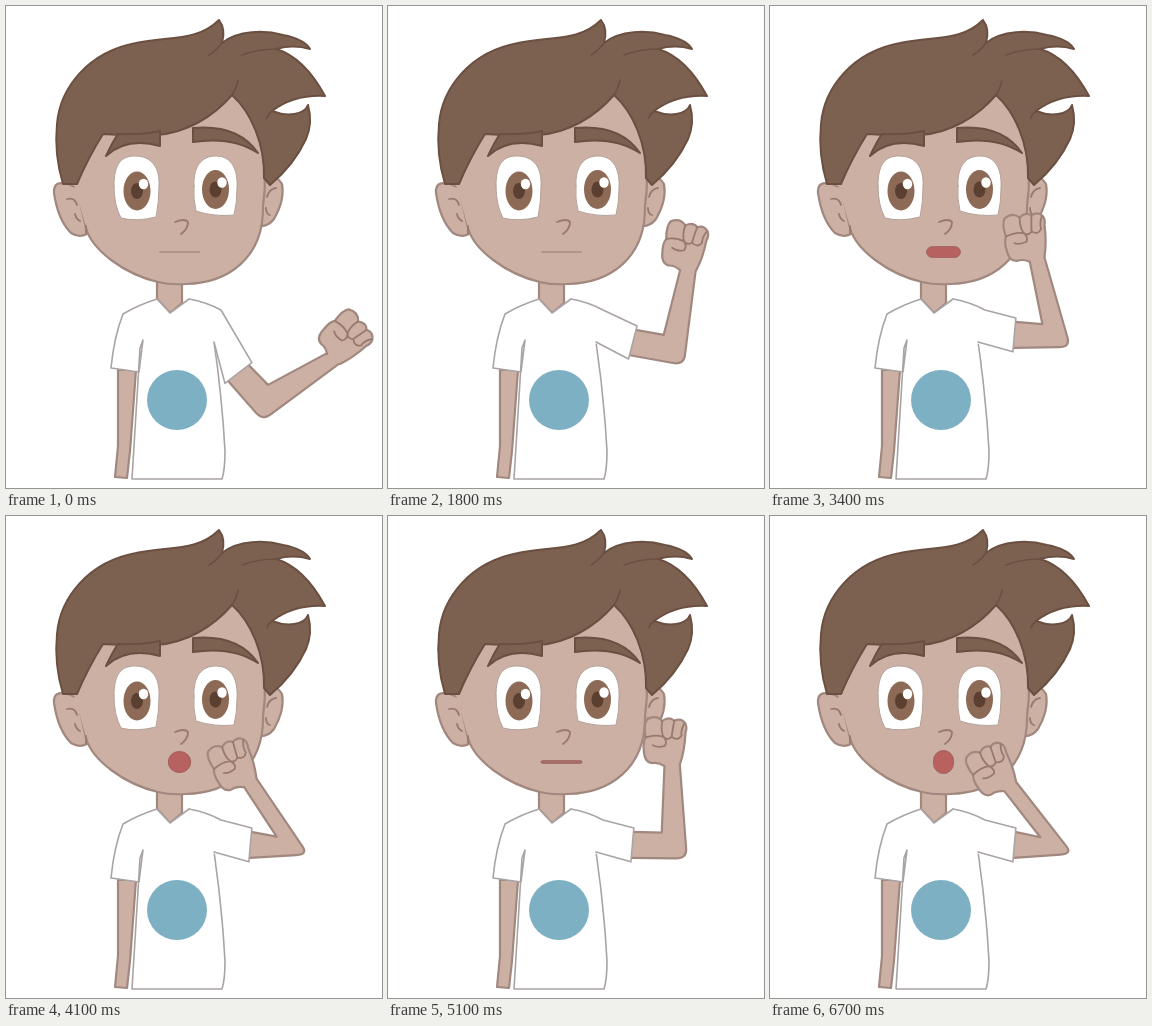
These frames come from a looping animation (376x482 px, 6.8 s). An HTML page:

```html
<!DOCTYPE html>
<html lang="en">
<head>
<meta charset="utf-8">
<title>Boy raising his fist</title>
<style>
  html, body { margin: 0; width: 100%; height: 100%; overflow: hidden; background: #fff; }
  svg { display: block; width: 376px; height: 482px; }
  path { stroke-linejoin: round; stroke-linecap: round; }
  .skin { fill: #cdb0a4; stroke: #a1887f; stroke-width: 2.2; }
  .hair { fill: #7c6150; stroke: #6b4f41; stroke-width: 2; }
  .cloth { fill: #fff; stroke: #a9a3a4; stroke-width: 1.6; }
  .line { fill: none; stroke: #98796d; stroke-width: 1.8; }
  .strand { fill: none; stroke: #6b4f41; stroke-width: 1.6; }
  .eye { fill: #fff; stroke: #b3a19a; stroke-width: 1; }
</style>
</head>
<body>
<svg viewBox="0 0 376 482">
  <!-- head -->
  <path class="skin" d="M112 364 V440 L109 471 L121 472 L124 445 L130 364Z"/>
  <path class="skin" d="M151 270 V293 L164 307 L176 297 V270Z"/>
  <path class="skin" d="M257 174 Q268 165 276 178 Q279 194 268 213 Q262 221 253 220Z"/>
  <path class="skin" d="M62 178 Q47 174 48 187 Q52 214 65 227 Q73 232 81 228 L90 190Z"/>
  <path class="skin" d="M80 222 C86 244 118 268 152 276 Q164 279 180 278 C222 277 258 252 257 200 Q267 130 226 86 L98 120 Q76 160 70 178Z"/>
  <path d="M68 179 L80 221 L100 210 L100 160Z" fill="#cdb0a4"/>
  <path class="line" d="M61 193 Q69 191 71 199 M69 208 Q70 213 74 215 M80 220 V227 M270 182 Q263 183 261 191 M260 202 Q260 208 264 209"/>
  <path class="hair" d="M57 178 C51 158 49 138 51 118 C54 82 82 46 130 37 C162 30 191 36 213 14 Q220 23 216 37 C232 24 259 24 277 29 Q298 33 304 43 Q287 38 270 43 C290 49 306 66 319 90 C300 89 282 93 266 105 C281 111 298 109 302 99 Q307 117 300 133 Q288 159 264 179 L258 172 C259 138 245 106 226 89 C207 111 180 127 150 129 Q125 130 97 128 Q82 152 71 178Z"/>
  <path class="strand" d="M216 37 Q210 45 203 49 M226 89 Q231 81 232 74 M270 43 Q252 43 236 49 M266 105 Q262 108 261 112"/>
  <path class="hair" d="M100 150 Q107 135 112 128 Q134 129 154 125 V140 Q121 131 100 150Z"/>
  <path class="hair" d="M187 122 Q232 118 252 147 Q226 130 187 136Z"/>
  <path class="eye" d="M108 180 C108 158 115 150 129 150 C146 150 154 162 153 180 Q153 197 150 211 Q130 216 115 212 Q108 199 108 180Z"/>
  <path class="eye" d="M188 180 C187 160 196 150 210 150 C226 150 232 164 231 182 Q231 197 228 209 Q208 211 190 205 Q187 192 188 180Z"/>
  <g id="eyes"></g>
  <path class="line" d="M169 216 Q179 212 182 216 Q182 223 175 228"/>
  <rect id="mouth" stroke-width="1"/>
  <!-- shirt -->
  <path class="cloth" d="M208 336 Q216 390 219 445 Q219 464 216 473 H126 L134 342 L137 334 L133 366 L105 362 Q108 331 117 308 Q132 299 151 293 L164 307 L183 293"/>
  <path d="M183 294 L215 305 L209 338 L180 330Z" fill="#fff"/>
  <circle cx="171" cy="394" r="30" fill="#7db0c2"/>
  <!-- arm -->
  <path id="arm" class="skin"/>
  <g id="fist">
    <path class="skin" d="M-8 4 Q-14 0 -20 1 Q-28 0 -28 -12 Q-29 -20 -26 -25 Q-28 -38 -24 -43 Q-15 -48 -9 -41 Q-2 -46 3 -41 Q10 -44 14 -38 Q16 -34 14 -29 Q13 -12 8 2"/>
    <path class="line" d="M-26 -25 Q-16 -28 -8 -25 Q-4 -20 -7 -16 Q-14 -14 -19 -17 M-9 -41 Q-11 -31 -8 -25 Q-4 -21 0 -25 M3 -41 Q1 -31 0 -25 Q6 -20 10 -26 M13 -38 Q9 -31 10 -26"/>
  </g>
  <path id="sleeve" class="cloth"/>
</svg>
<script>
const LOOP = 6800, STEP = 100;
const SHOULDER = [200, 325];
const $ = id => document.getElementById(id);

$('eyes').innerHTML = [[131, 185], [209.5, 183.5]].map(([x, y]) =>
  `<ellipse cx="${x}" cy="${y}" rx="13.5" ry="19.5" fill="#8c6a56"/>
   <ellipse cx="${x}" cy="${y}" rx="6" ry="8" fill="#5b4032"/>
   <ellipse cx="${x + 6.5}" cy="${y - 7}" rx="4.7" ry="5.3" fill="#fff"/>`).join('');

const clamp = v => Math.min(1, Math.max(0, v));
const ramp = (t, start, end) => clamp((t - start) / (end - start));
const mix = (a, b, k) => a.map((v, i) => v + (b[i] - v) * k);

function polar([x, y], degrees, length) {
  const a = degrees * Math.PI / 180;
  return [x + Math.cos(a) * length, y + Math.sin(a) * length];
}

function setAttrs(id, attrs) {
  for (const name in attrs) $(id).setAttribute(name, attrs[name]);
}

// Forearm tilt from upright: the arm rises once, then swings to the mouth twice.
function bendAt(t) {
  const rise = ramp(t, 1000, 2000);
  const swing = ramp(t, 2950, 4250) - ramp(t, 4250, 5000) + ramp(t, 5300, 6600);
  return 57 - 58.5 * rise - 36.5 * swing;
}

// The upper arm follows the forearm down, but never rises above level.
function drawArm(bend) {
  const upper = Math.max(3, 4.2 + 0.81 * bend), fore = bend - 90;
  const cuff = polar(SHOULDER, upper + 2, 44 + 0.18 * upper);
  const elbow = polar(SHOULDER, upper, 86 + 0.14 * upper);
  const wrist = polar(elbow, fore, 84 - 0.15 * Math.max(0, -bend));

  const across = (point, angle, half) => polar(point, angle - 90, half);
  const crook = (upper + 180 + fore + 360) / 2;
  const inner = polar(elbow, crook, 18), outer = polar(elbow, crook, -18);
  const wristIn = across(wrist, fore, 7.5), wristOut = across(wrist, fore, -7.5);
  const top = across(cuff, upper, 13), under = across(cuff, upper, -13);

  setAttrs('arm', { d: `M${top} L${inner} L${wristIn} L${wristOut}
    L${mix(outer, wristOut, 0.1)} Q${outer} ${mix(outer, under, 0.2)} L${under}` });
  setAttrs('fist', { transform: `translate(${wrist}) rotate(${0.78 * bend})` });
  setAttrs('sleeve', { d: `M183 293 Q200 296 215 304
    L${across(cuff, upper + 2, 17)} L${across(cuff, upper + 2, -17)} L208 336` });
}

// The mouth reddens and opens as the fist comes near.
function drawMouth(bend) {
  const red = clamp((10 - bend) / 20), open = clamp((-1.5 - bend) / 36.5);
  const w = 41 - 21 * open, h = 1 + 3 * red + 19 * open;
  const color = (from, to) => `rgb(${mix(from, to, red).map(Math.round)})`;
  setAttrs('mouth', {
    x: 173.5 - w / 2, y: 246 - h / 2, width: w, height: h, rx: Math.min(w, h) / 2,
    fill: color([152, 124, 113], [183, 98, 96]),
    stroke: red ? color([152, 124, 113], [162, 94, 90]) : 'none'
  });
}

const begin = performance.now();
function frame() {
  const now = Math.max(0, performance.now() - begin) % LOOP;
  const bend = bendAt(Math.floor(now / STEP) * STEP);
  drawArm(bend);
  drawMouth(bend);
  requestAnimationFrame(frame);
}
frame();
</script>
</body>
</html>
```
